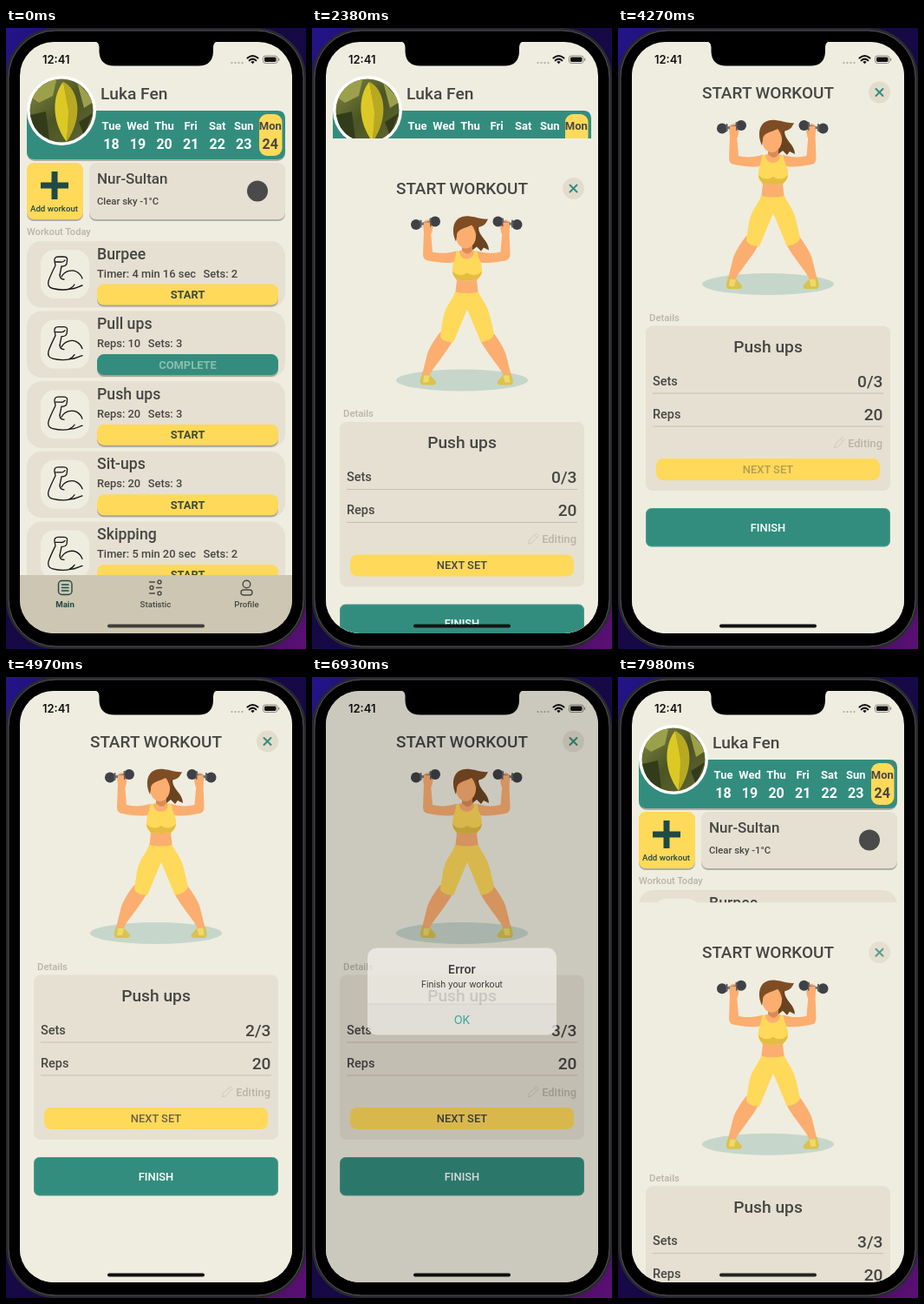
Animation, 346 px wide and 714 px high, one loop 8 s. Source, as an HTML page:

```html
<!DOCTYPE html>
<html lang="en">
<head>
<meta charset="utf-8">
<title>Workout app</title>
<style>
  html, body { margin: 0; width: 100%; height: 100%; overflow: hidden; background: #12083c; }
  svg { display: block; width: 346px; height: 714px; }
  text { font-family: Roboto, sans-serif; font-weight: 500; fill: #464644; }
  .system text { font-family: Inter, sans-serif; fill: #111; }
  .mid { text-anchor: middle; }
  .end { text-anchor: end; }
  .s10 { font-size: 9.7px; }
  .s11 { font-size: 11.3px; }
  .s13 { font-size: 12.9px; }
  .s14 { font-size: 14.5px; }
  .s18 { font-size: 17.7px; }
  .s19 { font-size: 19.2px; }
  .bold { font-weight: 700; }
  .muted { fill: #b8b4a6; }
  .white { fill: #fff; }
  .forest { fill: #1f4a45; }
  .page { fill: #efede0; }
  .card { fill: #e6e0d2; }
  .yellow { fill: #ffd95a; }
  .teal { fill: #338d7e; }
  .skin { fill: #fbae70; }
  .shade { fill: #000; opacity: .27; }
  .line { fill: none; stroke-linecap: round; stroke-linejoin: round; }
</style>
</head>
<body>
<svg viewBox="0 0 346 714">
  <defs>
    <linearGradient id="wall" x1="0" y1="0" x2="1" y2="1">
      <stop offset="0" stop-color="#24148a"/>
      <stop offset=".3" stop-color="#150a48"/>
      <stop offset=".7" stop-color="#170843"/>
      <stop offset="1" stop-color="#5c1075"/>
    </linearGradient>
    <linearGradient id="foliage" x1="0" y1="0" x2="1" y2="1">
      <stop offset="0" stop-color="#8a9048"/>
      <stop offset=".5" stop-color="#4b5424"/>
      <stop offset="1" stop-color="#626b34"/>
    </linearGradient>
    <clipPath id="screen"><rect x="16" y="16" width="314" height="680" rx="39"/></clipPath>
    <clipPath id="photo"><circle cx="64" cy="95" r="36.5"/></clipPath>
    <g id="arm" class="line" stroke="#151515" stroke-width="1.3">
      <path d="M48 41C44 42 40 45 34 45C28 46.500 20 46 14 44.500C9 43.500 8 40 9 36C11 30 14 24 17 18L16 13C15.500 10 17 8 20 8H27C30 8 31 10 30.500 12L30 16C29 19 26 19 24 19L22 29"/>
      <path d="M17 14H23C26 14.500 27 13 28 12M22 29C22 32 24 34 27 34M24 31C28 24 36 22.500 41 25C45 27 47 30 48 33M33 45C36 43.500 38 42 39 40"/>
    </g>
    <g id="limbs">
      <path class="skin" d="M171 147L166 146C156 149 147 149 139 147L137 123L129 123L128 150Q128 156 134 157C146 159 157 161 166 158Z"/>
      <path class="skin" d="M129 125L128 115Q129 110 134 110Q140 111 140 116L138 126Z"/>
      <path class="skin" d="M148 239C143 245 133 260 132 268L127 288L135 290C140 279 153 266 163 248Z"/>
      <path fill="#d9c350" d="M127 286C128 289 133 290 136 288C138 292 143 294 143 298L141 300H127Q124 298 125 294Z"/>
      <path d="M129 289L136 289L134 297H128Z" fill="#f0d968"/>
      <path d="M120 116L142 112" stroke="#77787c" stroke-width="3"/>
      <g fill="#3f4146">
        <circle cx="120" cy="115.500" r="6"/><circle cx="142" cy="112" r="6"/>
      </g>
      <path class="line" d="M125.500 111V118M136.500 109V117" stroke="#5c5e63" stroke-width="2"/>
      <path class="skin" d="M129 113h7v6h-7z"/>
    </g>
  </defs>

  <rect width="346" height="714" fill="url(#wall)"/>
  <rect x="1.500" y="1.500" width="343" height="711" rx="56" fill="#000" stroke="#29292d" stroke-width="3"/>
  <rect x="3" y="3" width="340" height="708" rx="54" fill="none" stroke="#55555a"/>

  <g clip-path="url(#screen)">
    <rect class="page" x="16" y="16" width="314" height="680"/>

    <g id="home">
      <rect class="shade" x="24" y="97" width="298" height="56" rx="9"/>
      <path class="teal" d="M24 95H313Q322 95 322 104V142Q322 151 313 151H33Q24 151 24 142Z"/>
      <circle cx="64" cy="95" r="40" fill="#fff"/>
      <g clip-path="url(#photo)">
        <rect x="24" y="55" width="80" height="80" fill="url(#foliage)"/>
        <path d="M27 78L44 60L58 60L54 78L38 86ZM82 62L102 84L90 92Z" fill="#9da04b"/>
        <path d="M28 100L46 96L50 128L34 120ZM84 108L100 98L90 124Z" fill="#333c1a"/>
        <path d="M66 62C54 76 51 106 70 131L73 96Z" fill="#dcc926"/>
        <path d="M66 62C84 70 90 102 70 131L72 96Z" fill="#b9a822"/>
      </g>
      <text x="109" y="82" class="s19">Luka Fen</text>
      <g id="week"></g>

      <rect class="shade" x="24" y="157" width="65" height="65" rx="8"/>
      <rect class="yellow" x="24" y="155" width="65" height="65" rx="8"/>
      <path d="M56 165V197M40 181H72" stroke="#1f4a45" stroke-width="7"/>
      <text x="55.500" y="211" class="s10 mid forest">Add workout</text>

      <rect class="shade" x="96" y="157" width="226" height="65" rx="8"/>
      <rect class="card" x="96" y="155" width="226" height="65" rx="8"/>
      <text x="105" y="179" font-size="17">Nur-Sultan</text>
      <text x="105" y="203" class="s11">Clear sky -1°C</text>
      <circle cx="290" cy="187.500" r="12" fill="#4a4a4a"/>

      <text x="24" y="238" class="muted" font-size="11.1">Workout Today</text>
      <g id="workouts"></g>

      <rect x="16" y="629" width="314" height="67" fill="#cdc6b2"/>
      <g class="line" stroke="#4a4a46" stroke-width="1.4">
        <g stroke="#1f4a45">
          <rect x="60.500" y="635.500" width="15.500" height="16" rx="4"/>
          <path d="M64.500 640H72M64.500 643.500H72M64.500 647H72"/>
        </g>
        <path d="M165.500 637H171.500M173.500 643.500H179.500M165.500 650H171.500"/>
        <circle cx="177" cy="637" r="2"/><circle cx="168" cy="643.500" r="2"/><circle cx="177" cy="650" r="2"/>
        <circle cx="277.500" cy="639.500" r="4.300"/>
        <rect x="271" y="646" width="13" height="6" rx="3"/>
      </g>
      <g class="s10 mid">
        <text x="68" y="665.500" class="bold forest">Main</text>
        <text x="172.500" y="665.500">Statistic</text>
        <text x="277.500" y="665.500">Profile</text>
      </g>
    </g>

    <g id="modal">
      <rect class="page" x="16" y="16.500" width="314" height="680"/>
      <text x="173" y="80.500" class="mid" font-size="19">START WORKOUT</text>
      <g id="close">
        <circle cx="301.500" cy="74" r="12.500" fill="#e3dccd"/>
        <path class="line" d="M297.500 70L305.500 78M305.500 70L297.500 78" stroke="#338d7e" stroke-width="2"/>
      </g>

      <ellipse cx="173" cy="294.500" rx="76" ry="12.500" fill="#c7d6cb"/>
      <path d="M182 108L200 112L192 119C192 129 204 134 204 145L198 142L195 146L190 141L185 145L180 120Z" fill="#6a4420"/>
      <use href="#limbs"/>
      <use href="#limbs" transform="translate(356.500 0) scale(-1 1)"/>
      <path class="skin" d="M165 147L173 145V137H185V145L192 147L195 170L190 180L192 196H165L167 180L162 170Z"/>
      <path d="M173 139L185 136V145Q180 153 173 145Z" fill="#d98d55"/>
      <path class="yellow" d="M166 147L170 146C170 158 187 158 187 146L191 147C191 155 197 160 196 168C196 175 192 177 190 179Q179 181 168 179C164 176 161 173 162 167C162 158 166 155 166 147Z"/>
      <path d="M162 169Q170 177 179 171Q188 177 196 169C195 175 192 177 190 179Q179 181 168 179Q163 176 162 169Z" fill="#e4bd42"/>
      <path class="yellow" d="M165 193Q179 196 192 193C195 201 203 208 206 224L210 241Q209 248 195 251L179 213L163 251Q149 250 148 243L151 224C154 208 162 203 165 193Z"/>
      <path class="skin" d="M166 118C166 109 189 109 189 119V129C189 137 183 143 177.500 143C171 143 166 136 166 129Z"/>
      <path d="M166 135C160 122 162 104 182 106C191 107 197 110 203 109C200 117 194 119 190 118V130C188 123 187 119 184 116C177 120 167 120 167 129Z" fill="#7f4d24"/>

      <text x="36" y="337" class="s11 muted">Details</text>
      <rect class="card" x="32" y="342.500" width="282" height="189.500" rx="8"/>
      <text x="173" y="373" class="s19 mid">Push ups</text>
      <text x="40" y="410.500" class="s14">Sets</text>
      <text x="305.500" y="413" class="s19 end" id="sets">0/3</text>
      <text x="40" y="448.500" class="s14">Reps</text>
      <text x="305.500" y="451" class="s19 end">20</text>
      <path d="M40 420H306M40 458H306" stroke="#c5bfb1"/>
      <path class="line" d="M249.500 482.500L250.500 478.500L258.500 470.500L261.500 473.500L253.500 481.500ZM256.500 472.500L259.500 475.500" stroke="#cfc9bb"/>
      <text x="305" y="481.500" class="s13 end muted">Editing</text>
      <rect class="yellow" x="44" y="495" width="258" height="25" rx="8"/>
      <text x="173" y="512" class="s13 mid" id="next">NEXT SET</text>
      <rect class="teal" x="32.500" y="552.500" width="281" height="43.500" rx="6" stroke="#4a9c8e"/>
      <text x="173" y="578.500" class="s13 mid white">FINISH</text>
    </g>

    <g class="system">
      <text x="42" y="41" font-size="13" style="font-weight:600">12:41</text>
      <path class="line" d="M260.500 40H273" stroke="#a9a79d" stroke-width="2.200" stroke-dasharray="0 4"/>
      <g class="line" stroke="#111" stroke-width="2.100" stroke-linecap="butt">
        <path d="M278.500 34.500Q284.500 29.500 290.500 34.500M280.700 37.300Q284.500 34 288.300 37.300"/>
      </g>
      <path d="M282.300 39Q284.500 37.200 286.700 39L284.500 41.300Z" fill="#111"/>
      <rect x="296.500" y="32" width="16.500" height="8.500" rx="2.600" fill="none" stroke="#8d8b83"/>
      <rect x="298" y="33.500" width="13.500" height="5.500" rx="1.400" fill="#111"/>
      <path d="M314.600 34.800V37.800" stroke="#8d8b83" stroke-width="1.300"/>
    </g>
    <rect id="indicator" x="117" y="685.500" width="112" height="4" rx="2" fill="#111"/>

    <rect id="dim" x="16" y="16" width="314" height="680" opacity="0"/>
    <g id="alert" class="system mid" opacity="0">
      <rect x="64" y="311.500" width="218" height="100" rx="11" fill="#f1efe8"/>
      <path id="pressed" d="M64 376H282V400.500Q282 411.500 271 411.500H75Q64 411.500 64 400.500Z" fill="#000" opacity="0"/>
      <path d="M64 376H282" stroke="#cfccc3" stroke-width=".7"/>
      <text x="173" y="341" font-size="13.300" style="font-weight:600">Error</text>
      <text x="173" y="356.500" font-size="10.100" style="font-weight:400">Finish your workout</text>
      <text x="173" y="399" font-size="13" style="font-weight:400;fill:#0b9a96">OK</text>
    </g>
  </g>
  <path d="M101 15Q107.500 16 107.500 22V27Q108 43.500 125 43.500H222Q238.500 43.500 239 27V22Q239 16 245 15Z"/>
</svg>

<script>
const $ = id => document.getElementById(id);

const days = ['Tue', 'Wed', 'Thu', 'Fri', 'Sat', 'Sun', 'Mon'];
$('week').innerHTML = '<rect class="yellow" x="292" y="99" width="26.500" height="48" rx="9"/>' +
  days.map((day, i) => {
    const x = 121.5 + i * 30.55;
    const tone = i === 6 ? '' : 'white';
    return `<text x="${x}" y="116.500" class="mid ${tone}" font-size="13" style="font-weight:600">${day}</text>
      <text x="${x}" y="139" class="mid bold ${tone}" font-size="16">${18 + i}</text>`;
  }).join('');

const workouts = [
  ['Burpee', 'Timer: 4 min 16 sec', 2],
  ['Pull ups', 'Reps: 10', 3, true],
  ['Push ups', 'Reps: 20', 3],
  ['Sit-ups', 'Reps: 20', 3],
  ['Skipping', 'Timer: 5 min 20 sec', 2],
];
$('workouts').innerHTML = workouts.map(([name, goal, sets, done], i) => `
  <g transform="translate(0 ${245 + i * 80.6})">
    <rect class="card" x="24" width="298" height="76.500" rx="17"/>
    <rect class="page" x="40" y="10" width="56" height="56" rx="16"/>
    <use href="#arm" x="40" y="10"/>
    <text x="105" y="20.500" class="s18">${name}</text>
    <text x="105" y="41.500" class="s13">${goal}<tspan dx="8.500">Sets: ${sets}</tspan></text>
    <rect class="shade" x="105" y="51.500" width="209" height="24" rx="8"/>
    <rect class="${done ? 'teal' : 'yellow'}" x="105" y="49.500" width="209" height="24" rx="8"/>
    <text x="209.500" y="66" class="s13 mid bold label"
      style="fill:${done ? '#8cbdab' : '#3d4a38'}">${done ? 'COMPLETE' : 'START'}</text>
  </g>`).join('');
const startLabel = document.querySelectorAll('.label')[2];

const LOOP = 8000, TICK = 70, HEIGHT = 680;
const OPEN = 2201, CLOSE = 7911.3;
const setPresses = [[4270, 4410], [4690, 4760], [5110, 5180], [5740, 5740]];

// Distance left (1 to 0) in a critically damped spring.
function spring(t, start) {
  const x = Math.max(0, t - start) * 0.01826;
  return Math.exp(-x) * (1 + x);
}

// Label opacity: drops on touch, eases back after release.
function touch(t, down, up, recovery = 350) {
  if (t < down) return 1;
  const p = Math.min(1, Math.max(0, t - up) / recovery);
  const eased = p < 0.5 ? 2 * p * p : 1 - 2 * (1 - p) ** 2;
  return 0.4 + 0.6 * eased;
}

function render(t) {
  const hidden = t < CLOSE ? spring(t, OPEN) : 1 - spring(t, CLOSE);
  $('modal').setAttribute('transform', `translate(0 ${(HEIGHT * hidden).toFixed(2)})`);
  $('indicator').setAttribute('opacity', 1 - 0.25 * hidden);

  startLabel.style.opacity = touch(t, 910, 910, 490);
  $('close').style.opacity = touch(t, 7770, 7770);
  const press = setPresses.filter(([down]) => t >= down).pop();
  $('next').style.opacity = press ? touch(t, ...press) : 1;
  const count = setPresses.slice(0, 3).filter(([, up]) => t >= up).length;
  $('sets').textContent = `${count}/3`;

  const entering = spring(t, 5728);
  const shown = t < 6881 ? 1 - entering : spring(t, 6881);
  const scale = 1 + 0.19 * entering;
  $('dim').setAttribute('opacity', 0.2 * shown);
  $('alert').setAttribute('opacity', shown);
  $('alert').setAttribute('transform', `translate(173 361.5) scale(${scale}) translate(-173 -361.5)`);
  $('pressed').setAttribute('opacity', t >= 6790 ? 0.03 : 0);
}

const origin = performance.now();
function frame() {
  const t = (performance.now() - origin) % LOOP;
  render(Math.floor(t / TICK) * TICK);
  requestAnimationFrame(frame);
}
frame();
</script>
</body>
</html>
```
